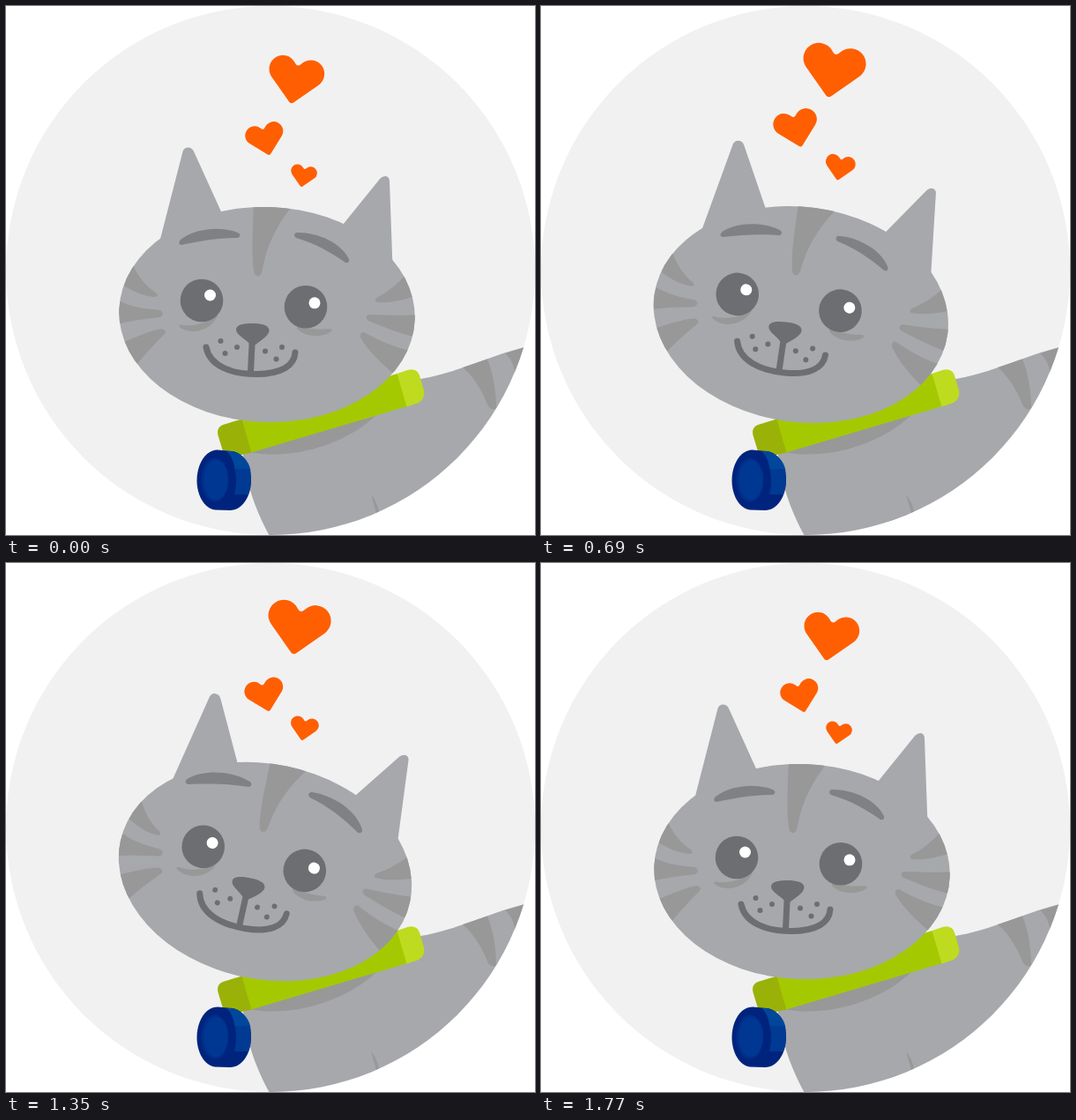
An HTML page for the animation above (1.8 s loop, 600 by 600 pixels).

```html
<!DOCTYPE html>
<html lang="en">
<head>
<meta charset="utf-8">
<title>Happy cat</title>
<style>
  html, body { margin: 0; width: 100%; height: 100%; overflow: hidden; background: #fff; }
  svg { display: block; width: 600px; height: 600px; }
  .fur { fill: #a7a8ab; }
  .stripe { fill: #989898; }
  .dark { fill: #6d6e71; }
  .brow { fill: #808184; }
  .line { fill: none; stroke: #6d6e71; stroke-width: 7; stroke-linecap: round; }
  .heart { fill: #ff5f00; }
</style>
</head>
<body>
<svg viewBox="0 0 600 600">
  <defs>
    <clipPath id="disc"><circle cx="300" cy="300" r="300"/></clipPath>
    <clipPath id="face"><ellipse cx="296" cy="350" rx="167.8" ry="122" transform="rotate(2 296 350)"/></clipPath>
    <path id="heart" d="M-4,-9.8 A15.5,15.5 0 1 0 -27.1,10.8 L-2.5,35.3 Q0,37.5 2.5,35.3 L27.1,10.8 A15.5,15.5 0 1 0 4,-9.8 Q0,-4 -4,-9.8Z"/>
  </defs>

  <circle cx="300" cy="300" r="300" fill="#f1f1f1"/>

  <!-- body -->
  <g clip-path="url(#disc)">
    <path class="fur" d="M268,500 C272,545 285,575 299,601 L600,600 V384 C550,395 520,414 470,423 L430,430Z"/>
    <g class="stripe">
      <path d="M276,506 C320,515 382,500 420,464Z"/>
      <path d="M518,410 C534,424 541,440 547,454 Q552,460 556,456 C556,435 552,415 546,400.500Z"/>
      <path d="M566,394 C573,400 576,407 578,418 L592,386Z"/>
      <path d="M414,554 Q421,562 423,574 L420,575Z"/>
    </g>
  </g>

  <!-- collar -->
  <path fill="#a4c900" d="M267,469 L444,417 L455,454 L278,506.500Z"/>
  <path fill="#9ab207" d="M267.500,468.500 L278.500,506.500 L258,511 Q248,511 246,505 L240.500,487 Q238.500,478 246,475Z"/>
  <path fill="#bedb1f" d="M443.500,417 L456,412.800 Q466,410.500 469,419 L474,436 Q476,445 468,450 L454.500,454.500Z"/>

  <!-- tag -->
  <path fill="#00247d" d="M240,503.500 L257,505 C270,507 278,522 278,538 C278,556 268,572 254,572 L237,571.500 C225,570 216.500,555 216.500,538 C216.500,520 226,503.500 240,503.500Z"/>
  <path fill="#00479b" d="M250,504.700 L258,505.200 C268,508 275.500,517 277,525 H259.500 C258,516 255,509 250,504.700Z"/>
  <path fill="#003a92" d="M259.500,525 H277 C278.500,535 278,545 275,554 H259 C261.500,545 261.500,535 259.500,525Z"/>
  <ellipse cx="237" cy="537.500" rx="15.500" ry="25" fill="#002f8a"/>
  <ellipse cx="238" cy="537.500" rx="13.500" ry="22.500" fill="#003793"/>

  <!-- head -->
  <g id="head">
    <g class="fur">
      <path d="M173,272 L200.500,165 Q202,160.500 206.500,160.500 Q211,160.500 213,165 L248,242 L220,290Z"/>
      <path d="M378,253 L424.500,195.500 Q427.500,192.500 431,193 Q435,194 435,199 L438.500,296 L400,300Z"/>
      <ellipse cx="296" cy="350" rx="167.800" ry="122" transform="rotate(2 296 350)"/>
    </g>
    <g class="stripe" clip-path="url(#face)">
      <path d="M281,222 C280,250 278,280 281,300 Q282,307 287,306 Q290,305 291,298 C296,270 308,248 325,226Z"/>
      <path d="M142,290 C150,308 160,319 170,325 Q174,329 169,330 C155,329 145,324 130,315Z"/>
      <path d="M122,331 C140,342 160,344 175,345 Q181,349 175,353 C160,355 145,356 126,361Z"/>
      <path d="M130,383 C150,374 165,368 176,366 Q183,367 180,372 C170,382 160,392 149,406Z"/>
      <path d="M455,303 C442,318 430,326 420,331 Q417,335 421,336 C435,337 448,334 468,328Z"/>
      <path d="M468,350 C445,352 425,350 411,350 Q406,353 411,357 C428,364 445,371 466,376Z"/>
      <path d="M406,370 C422,379 438,386 458,391 L442,419 C425,405 410,390 402,376 Q401,370 406,370Z"/>
    </g>
    <g class="stripe">
      <path d="M198,361.500 C212,364 226,360 240,351 C234,367 212,374 198,365 Q194,362 198,361.500Z"/>
      <path d="M330,363 C345,367 358,367 368,366 Q372,368 366,371 C352,377 338,374 330,366Z"/>
    </g>
    <g class="dark">
      <circle cx="222" cy="334" r="24.300"/>
      <circle cx="340" cy="341.300" r="24.300"/>
      <path d="M261,367 C261,361 270,360 280,360 C290,360 298.500,362 298.500,368 C298.500,374 288,380 283,384 Q279,387 276,383 C271,377 261,373 261,367Z"/>
      <g id="dots"></g>
    </g>
    <g fill="#fff">
      <circle cx="231.500" cy="328" r="6.500"/>
      <circle cx="350" cy="336.800" r="6.500"/>
    </g>
    <path class="line" stroke-linecap="butt" d="M279,384 L277.500,415"/>
    <path class="line" d="M227,387 C231,408 255,417.500 284,417.500 C312,417.500 327,408 328,393"/>
    <path id="browL" class="brow" d="M198,265 C212,254 240,248 263,257 Q268,260 263,263 C240,263 220,267 199,271 Q194,270 198,265Z"/>
    <path id="browR" class="brow" d="M329,257 C352,256 380,268 389,287 Q390,292 385,291 C368,279 350,269 329,263 Q325,260 329,257Z"/>
  </g>

  <g id="hearts" class="heart"></g>
</svg>
<script>
const LOOP = 1800, STEP = 30;
const NS = "http://www.w3.org/2000/svg";
const $ = id => document.getElementById(id);

function add(parent, tag, attrs) {
  const el = document.createElementNS(NS, tag);
  for (const k in attrs) el.setAttribute(k, attrs[k]);
  return parent.appendChild(el);
}

function bezier(x1, y1, x2, y2) {
  const at = (a, b, u) => 3 * a * u * (1 - u) ** 2 + 3 * b * u * u * (1 - u) + u ** 3;
  return x => {
    let lo = 0, hi = 1;
    for (let i = 0; i < 24; i++) {
      const mid = (lo + hi) / 2;
      if (at(x1, x2, mid) < x) lo = mid; else hi = mid;
    }
    return at(y1, y2, lo);
  };
}
const ease = bezier(.25, .1, .25, 1);
const easeInOut = bezier(.42, 0, .58, 1);

const part = (t, a, b) => Math.min(1, Math.max(0, (t - a) / (b - a)));

// Rises from 0 to 1 over a..b, falls back over c..d.
const swell = (t, [a, b, c, d], rise = easeInOut) =>
  rise(part(t, a, b)) - easeInOut(part(t, c, d));

for (const [cx, cy] of [[243.5, 380], [248.5, 394], [262, 387], [294, 391.5], [306.5, 400.5], [313, 387]])
  add($("dots"), "circle", { cx, cy, r: 3 });

const hearts = [
  { x: 329.8, y: 74.3, dx: 3.7, dy: -13.3, size: 1, tilt: 10, span: [200, 850, 1220, 1750] },
  { x: 292.8, y: 144.5, dx: -4.7, dy: -13.1, size: .69, tilt: -13.5, span: [20, 680, 930, 1470] },
  { x: 338, y: 188.2, dx: 1.9, dy: -10.6, size: .472, tilt: 10.5, span: [130, 770, 1080, 1620] }
];
for (const h of hearts) h.el = add($("hearts"), "use", { href: "#heart" });

const brows = [
  { el: $("browL"), x: 265, y: 260, dx: -2, dy: -6.8 },
  { el: $("browR"), x: 327, y: 259, dx: 4, dy: -6.8 }
];

function draw(t) {
  const tilt = 9.7 * swell(t, [360, 1350, 1350, 1770], ease);
  $("head").setAttribute("transform", `rotate(${tilt} 295 338)`);

  const lift = swell(t, [690, 1080, 1140, 1680]);
  for (const b of brows)
    b.el.setAttribute("transform",
      `translate(${b.x + b.dx * lift} ${b.y + b.dy * lift}) scale(${1 + .11 * lift}) translate(${-b.x} ${-b.y})`);

  for (const h of hearts) {
    const k = swell(t, h.span);
    h.el.setAttribute("transform",
      `translate(${h.x + h.dx * k} ${h.y + h.dy * k}) rotate(${h.tilt}) scale(${h.size * (1 + .15 * k)})`);
  }
}

const start = performance.now();
function tick() {
  const t = (performance.now() - start) % LOOP;
  draw(Math.floor(t / STEP) * STEP);
  requestAnimationFrame(tick);
}
tick();
</script>
</body>
</html>
```
